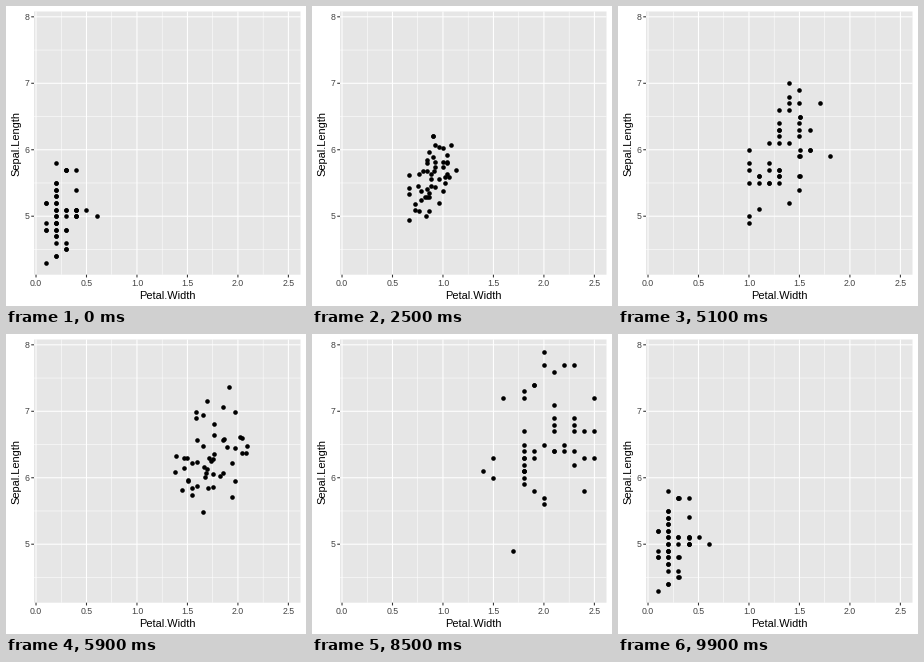
Animation of 300x300 px, one loop 10000 ms. Source, as a matplotlib script:

```python
import numpy as np
import matplotlib.pyplot as plt
from matplotlib.animation import FuncAnimation
from matplotlib.patches import Rectangle

plt.rcParams["font.family"] = "Liberation Sans"

PX = 0.72  # points per pixel at 100 dpi
LEFT, RIGHT, TOP, BOTTOM = 28.0, 294.5, 5.5, 268.7
COUNT = 50

# Outlying flowers: (width, length) in tenths for each of the three states.
STRAYS = np.array([
    [3, 46, 16, 63, 17, 49], [2, 58, 13, 56, 24, 58], [6, 50, 10, 50, 23, 68],
    [2, 54, 18, 59, 23, 69], [4, 54, 10, 55, 20, 79], [2, 51, 14, 70, 25, 63],
    [2, 49, 15, 54, 14, 61], [1, 49, 14, 52, 25, 72], [2, 50, 10, 49, 18, 73],
    [2, 52, 17, 67, 18, 61], [5, 51, 12, 61, 18, 63], [1, 43, 14, 61, 20, 57],
]).reshape(-1, 3, 2)

# The crowd: first width, then the lengths found at each following width.
CROWDS = [
    (1, [[48, 52], [44, *range(46, 56)], [45, 48, 50, 51, 57], [50, 51, 57]]),
    (10, [[57, 58, 60], [51, 55, 56], [55, 57, 58],
          [*range(55, 58), *range(61, 65), 66], [66, 67, 68],
          [56, 59, 60, *range(62, 66), 67, 69], [60]]),
    (15, [[60, 63], [72], [], [*range(59, 66), 67, 72], [58, 63, 64, 74],
          [56, 65, 77], [64, *range(67, 70), 71, 76], [64, 65, 77],
          [62, 64, 67, 77], [63, 67], [67]]),
]


def px_x(width):
    return LEFT + (width + 0.02) / 2.64 * (RIGHT - LEFT)


def px_y(length):
    return TOP + (8.08 - length) / 3.96 * (BOTTOM - TOP)


def crowd(first, columns, rng):
    """All points of one crowd, some doubled, in shuffled order."""
    pts = np.array([(first + i, y) for i, col in enumerate(columns) for y in col])
    extra = rng.integers(len(pts), size=COUNT - len(STRAYS) - len(pts))
    return rng.permutation(np.vstack([pts, pts[extra]]))


def build_states():
    rng = np.random.default_rng(7)
    states = []
    for i, (first, columns) in enumerate(CROWDS):
        tenths = np.vstack([STRAYS[:, i], crowd(first, columns, rng)])
        width, length = tenths.T / 10
        states.append(np.column_stack([px_x(width), px_y(length)]))
    return states


def ease(t):
    return 4 * t**3 if t < 0.5 else 1 - 4 * (1 - t)**3


def positions(frame):
    for i, (start, steps) in enumerate([(16, 17), (50, 17), (84, 16)]):
        if frame <= start + steps:
            k = ease(max(0, frame - start) / steps)
            return (1 - k) * STATES[i] + k * STATES[(i + 1) % 3]


def line(xs, ys, color, width, z):
    ax.plot(xs, ys, color=color, lw=width * PX, zorder=z, snap=False,
            solid_capstyle="butt")


def label(x, y, text, size, color, **kw):
    ax.text(x, y, text, fontsize=size * PX, color=color, va="baseline", **kw)


def draw_panel():
    ax.add_patch(Rectangle((LEFT, TOP), RIGHT - LEFT, BOTTOM - TOP, fc="#e6e6e6",
                           lw=0, zorder=0, snap=False))
    for v in np.arange(0.25, 2.5, 0.5):
        line([px_x(v)] * 2, [TOP, BOTTOM], "white", 0.53, 1)
    for v in np.arange(4.5, 8):
        line([LEFT, RIGHT], [px_y(v)] * 2, "white", 0.53, 1)
    for v in np.arange(0, 2.6, 0.5):
        x = px_x(v)
        line([x, x], [TOP, BOTTOM], "white", 1.07, 2)
        line([x, x], [BOTTOM, BOTTOM + 2.75], "#333333", 1.07, 2)
        label(x, 280, f"{v:.1f}", 8.8, "#444444", ha="center")
    for v in range(5, 9):
        y = px_y(v)
        line([LEFT, RIGHT], [y, y], "white", 1.07, 2)
        line([LEFT - 2.75, LEFT], [y, y], "#333333", 1.07, 2)
        label(23.1, y + 3.2, str(v), 8.8, "#444444", ha="right")
    label((LEFT + RIGHT) / 2, 292.8, "Petal.Width", 11, "black", ha="center")
    label(13.4, (TOP + BOTTOM) / 2, "Sepal.Length", 11, "black", ha="center",
          rotation=90, rotation_mode="anchor")


def update(frame):
    dots.set_offsets(positions(frame))
    return dots,


STATES = build_states()
fig = plt.figure(figsize=(3, 3), dpi=100, facecolor="white")
ax = fig.add_axes([0, 0, 1, 1])
ax.axis("off")
draw_panel()
dots = ax.scatter(*STATES[0].T, s=(4.6 * PX)**2, c="black", linewidths=0, zorder=3)
ax.set_xlim(0, 300)
ax.set_ylim(300, 0)

anim = FuncAnimation(fig, update, frames=100, interval=100, repeat=True,
                     repeat_delay=0)
plt.show()
```
